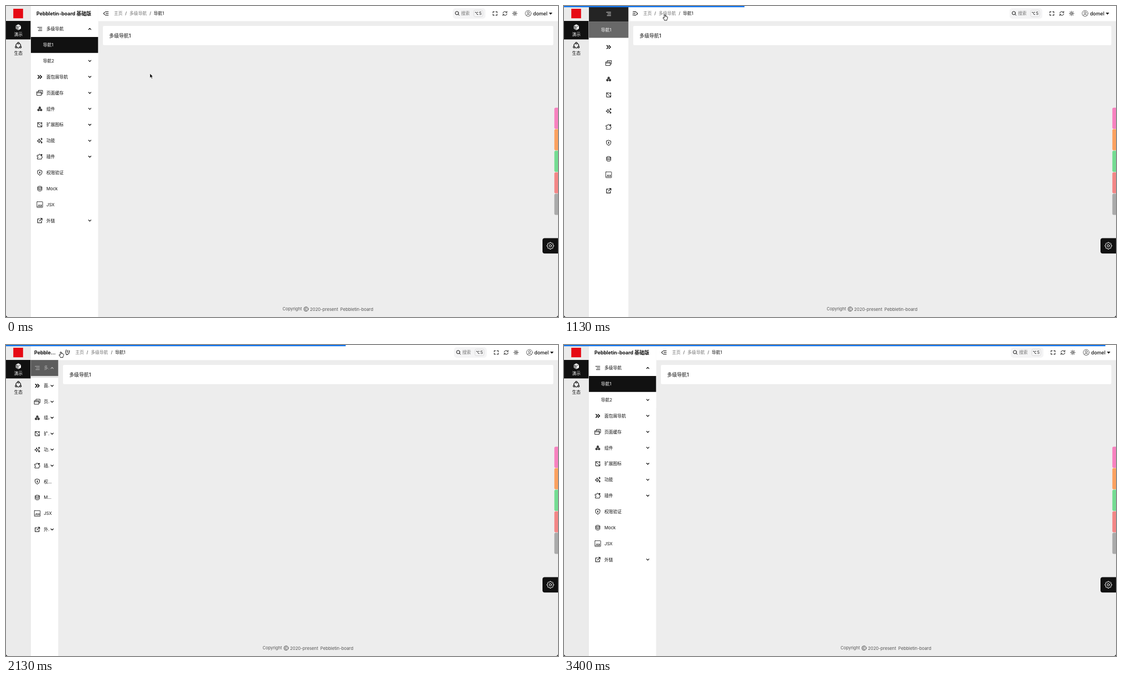
Animation of 997 by 562 pixels, one loop 3470 ms. Source, as an HTML page:

```html
<!DOCTYPE html>
<html lang="en">
<head>
<meta charset="utf-8">
<title>Sidebar toggle</title>
<style>
html, body { margin: 0; width: 100%; height: 100%; overflow: hidden; background: #ededed; }
#stage { display: block; width: 997px; height: 562px; font-family: Inter, "Noto Sans CJK SC", "Noto Sans CJK", sans-serif; font-size: 7.78px; color: #111; }
text { fill: currentColor; white-space: pre; }
.i { fill: none; stroke: currentColor; stroke-width: 1; stroke-linecap: round; stroke-linejoin: round; }
.f { fill: currentColor; stroke: none; }
</style>
</head>
<body>
<svg id="stage" viewBox="0 0 997 562"></svg>
<script>
const stage = document.getElementById('stage');
const LOOP = 3470, STEP = 200 / 3, STEPS = 52;
const LEFT = 45, OPEN = 166.3, SHUT = 79.8, ROW = 28.85;
const CLOSE_AT = 1033, OPEN_AT = 2091;
const USER = 'domel', APP = 'Pebbletin-board';

function add(parent, tag, attrs = {}, inner = '') {
  const e = document.createElementNS('http://www.w3.org/2000/svg', tag);
  set(e, attrs);
  if (inner) e.innerHTML = inner;
  parent.appendChild(e);
  return e;
}
function set(e, attrs) { for (const k in attrs) e.setAttribute(k, attrs[k]); }
const rect = (p, x, y, width, height, fill, rx = 0) => add(p, 'rect', { x, y, width, height, fill, rx });
const move = (e, x, y, extra = '') => e.setAttribute('transform', `translate(${x} ${y}) ${extra}`);
const show = (e, on) => e.setAttribute('display', on ? 'inline' : 'none');

// text is placed by its vertical middle
function label(p, x, y, str, attrs = {}) {
  const size = attrs['font-size'] || 7.78;
  const e = add(p, 'text', { x, y: y + size * 0.365, ...attrs });
  e.textContent = str;
  return e;
}
function icon(p, x, y, body, attrs = {}) {
  const g = add(p, 'g', { class: 'i', ...attrs }, body);
  move(g, x, y);
  return g;
}
function fit(e, str, room) {
  e.textContent = str;
  for (let n = str.length - 1; n > 0 && e.getComputedTextLength() > room; n--) {
    e.textContent = str.slice(0, n) + '…';
  }
}

function bezier(x1, y1, x2, y2) {
  const at = (a, b, u) => 3 * (1 - u) ** 2 * u * a + 3 * (1 - u) * u * u * b + u ** 3;
  return x => {
    if (x <= 0) return 0;
    if (x >= 1) return 1;
    let lo = 0, hi = 1;
    for (let i = 0; i < 24; i++) {
      const u = (lo + hi) / 2;
      if (at(x1, x2, u) < x) lo = u; else hi = u;
    }
    return at(y1, y2, lo);
  };
}
const ease = bezier(0.25, 0.1, 0.25, 1);
const swift = bezier(0.4, 0, 0.2, 1);
// 0 = expanded, 1 = collapsed
const folded = (t, curve, ms) => curve((t - CLOSE_AT) / ms) - curve((t - OPEN_AT) / ms);
const edge = t => OPEN - (OPEN - SHUT) * folded(t, ease, 300);

const star = (x, y, r) => `<path d="M${x} ${y - r}Q${x} ${y} ${x + r} ${y}Q${x} ${y} ${x} ${y + r}Q${x} ${y} ${x - r} ${y}Q${x} ${y} ${x} ${y - r}Z"/>`;
const hex = (x, y) => `<path class="f" d="M${x} ${y - 2.3}l2 1.15v2.3l-2 1.15l-2-1.15v-2.3z"/><path d="M${x - 1.4} ${y - .7}l1.4.8l1.4-.8" stroke="#fff" stroke-width=".5"/>`;
const DOWN = '<path d="M-2.2-1.1L0 1.1L2.2-1.1" stroke-width="1.2"/>';
const UP = '<path d="M-2.2 1.1L0-1.1L2.2 1.1" stroke-width="1.2"/>';

// name, icon, has children
const MENU = [
  ['多级导航', '<path d="M-3.8-3H3.8M-1.6 0H3.8M-2.6 3H3.8" stroke-width="1.1"/>', 1],
  ['面包屑导航', '<path d="M-3.2-2.8L-.4 0L-3.2 2.8M.6-2.8L3.4 0L.6 2.8" stroke-width="1.6"/>', 1],
  ['页面缓存', '<path d="M-2.5-2V-4.5H5V1.8H2.8M-5-2H2.8V4.5H-5ZM-5 0H2.8" stroke-width=".9"/>', 1],
  ['组件', hex(0, -1.9) + hex(-2.3, 2) + hex(2.3, 2), 1],
  ['扩展图标', '<path d="M.5-3.8H-3.8V3.8H3.8V-.2M-3.8-3.8L3.8 3.8M3-4.3V-1.5M1.6-2.9H4.4"/>', 1],
  ['功能', star(-1.2, .4, 3.6) + star(3.2, -3, 1.5) + star(3.2, 3.2, 1.5), 1],
  ['插件', '<path d="M-4.4-2.6H-1.6Q-1.9-4.8 0-4.6Q1.4-4.5 1.2-2.6H3.2V-.4Q5-.2 4.8 1Q4.7 2.2 3.2 2V4.4H-4.4V2Q-2.7 2-2.8.8Q-2.9-.3-4.4-.2Z" stroke-width=".9"/>' + '<path class="f" d="M3.2-5L4.9-3.3L3.2-1.6L1.5-3.3Z"/>', 1],
  ['权限验证', '<path d="M0-4.6L3.9-3.2V.2Q3.7 3.2 0 4.7Q-3.7 3.2-3.9.2V-3.2Z"/><path d="M0-.8V1.6" stroke-width="1.2"/><circle class="f" cy="-1" r="1"/>', 0],
  ['Mock', '<ellipse cy="-2.7" rx="3.7" ry="1.5"/><path d="M-3.7-2.7V2.7Q-3.4 4.2 0 4.2T3.7 2.7V-2.7M-3.7 0Q-3.4 1.5 0 1.5T3.7 0"/>', 0],
  ['JSX', '<rect x="-5.2" y="-5.2" width="10.4" height="10.4" rx=".5" stroke-width=".8"/><text class="f" y="3.9" font-size="4.6" font-weight="700" text-anchor="middle">JSX</text>', 0],
  ['外链', '<path d="M-.6-3H-3.8V4H3.2V.8M1-4H4.2V-.8M4-3.8L-.6.8" stroke-width="1.1"/>', 1]
];

// main area
rect(stage, 0, 0, 997, 562, '#ededed');
const card = rect(stage, 175, 36, 813.5, 34.7, '#fff', 2);
const heading = label(stage, 0, 53.4, '多级导航1', { 'font-size': 8.85, 'font-weight': 500 });
const footer = add(stage, 'g', { color: '#555' });
label(footer, 499.5, 547.7, 'Copyright', { 'font-size': 7.5 });
icon(footer, 542, 547.7, '<circle r="4"/><path d="M1.6-1.4A2 2 0 1 0 1.6 1.4"/>', { 'stroke-width': .8 });
label(footer, 549, 547.7, '2020-present');
label(footer, 603.8, 547.7, APP);

// top bar
const bar = rect(stage, 0, 0, 997, 27.3, '#fff');
const crumbs = add(stage, 'g');
const toggle = icon(crumbs, 14.3, 13.5, '<path d="M-2.4-2.2L-4.4 0L-2.4 2.2M-1.2-3H4.2M-.2 0H4.2M-1.2 3H4.2" stroke-width="1.1"/>');
[[28.7, '主页', '#777'], [49, '/', '#333'], [56.8, '多级导航', '#777'], [93, '/', '#333'], [100.5, '导航1', '#111']]
  .forEach(([x, s, color]) => label(crumbs, x, 13.5, s, { color }));

const tools = add(stage, 'g');
rect(tools, 807, 4, 59, 19, '#f4f4f5', 5);
icon(tools, 815, 13.3, '<circle cx="-.5" cy="-.5" r="3"/><path d="M1.8 1.8L3.6 3.6"/>');
label(tools, 822, 13.5, '搜索', { color: '#777' });
set(rect(tools, 844.7, 7.3, 16.6, 12.2, '#f4f4f5', 3), { stroke: '#d4d4d4', 'stroke-width': .7 });
icon(tools, 850, 13.4, '<path d="M-2.6-2H-1L1 2H2.6M.8-2H2.6" stroke-width=".8"/>');
label(tools, 854.6, 13.5, 'S', { 'font-size': 7 });
icon(tools, 883.3, 13.5, '<path d="M-3.6-1.2V-3.2H-1.4M1.4-3.2H3.6V-1.2M3.6 1.2V3.2H1.4M-1.4 3.2H-3.6V1.2" stroke-width="1.1"/>');
icon(tools, 901.2, 13.5, '<path d="M-3.6-.6A3.7 3.7 0 0 1 3.2-1.8M3.6.6A3.7 3.7 0 0 1-3.2 1.8M3.6-3.9V-1.6H1.4M-3.6 3.9V1.6H-1.4" stroke-width=".9"/>');
const rays = [...Array(8).keys()].map(i => `<path d="M0-3.2V-4" transform="rotate(${i * 45})"/>`).join('');
icon(tools, 919, 13.5, '<circle r="1.7"/>' + rays);
icon(tools, 943.2, 13.4, '<circle r="5.3"/><circle cy="-1.3" r="1.9"/><path d="M-3.6 3.7Q-3 1.8 0 1.8T3.6 3.7"/>', { color: '#444', style: 'stroke-width:.8' });
label(tools, 952, 13.5, USER, { 'font-size': 8.8, 'font-weight': 500 });
icon(tools, 983.7, 13.7, '<path class="f" d="M-3.1-1.8H3.1L0 2Z"/>');

// primary strip
rect(stage, 0, 0, LEFT, 562, '#ebebeb');
rect(stage, 13.2, 5, 17.6, 17.2, '#e60a14');
rect(stage, 0, 27, 44.4, 33.4, '#111');
icon(stage, 22.2, 38.3, '<path d="M0-5.2L4.6-2.7L0-.2L-4.6-2.7Z" fill="#ddd"/><path d="M-4.8-2.2L-.2.3V5.4L-4.8 2.8Z" fill="#999"/><path d="M4.8-2.2L.2.3V5.4L4.8 2.8Z" fill="#fff"/>', { stroke: 'none', style: 'stroke:none' });
label(stage, 22.2, 51.2, '演示', { color: '#fff', 'text-anchor': 'middle' });
icon(stage, 22.2, 71.5, '<circle r="4.4"/><g fill="#ebebeb"><circle cy="-4.3" r="1.5"/><circle cx="-4" cy="2.8" r="1.5"/><circle cx="4" cy="2.8" r="1.5"/></g>', { style: 'stroke-width:1.2' });
label(stage, 22.2, 84.7, '生态', { 'text-anchor': 'middle' });

// secondary sidebar, clipped to its width
const side = add(stage, 'svg', { x: LEFT, y: 0, width: 121, height: 562 });
rect(side, 0, 0, 130, 562, '#fff');
const titleBox = add(side, 'svg', { y: 0, height: 27 });
const title = label(titleBox, 0, 13.6, '', { 'font-size': 8.85, 'font-weight': 700 });
const rows = MENU.map(([name, art, kids], n) => {
  const g = add(side, 'g');
  const back = n ? null : rect(g, 0, -ROW / 2, 130, ROW, '#fff');
  const mark = icon(g, 0, 0, art);
  const box = add(g, 'svg', { y: -12, height: 24 });
  const text = label(box, 0, 12, name);
  const arrow = kids ? icon(g, 0, 0, n ? DOWN : UP) : null;
  return { g, back, mark, box, text, arrow, name };
});
const sub = add(side, 'svg', { x: 0, width: 130 });
rect(sub, 0, 0, 130, ROW * 2, '#fff');
rect(sub, 0, 0, 130, ROW, '#111');
label(sub, 21.7, ROW / 2, '导航1', { color: '#fff' });
label(sub, 21.7, ROW * 1.5, '导航2');
const subArrow = icon(sub, 0, 0, DOWN);

// right edge
['#f781bf', '#fba15f', '#74dc92', '#f38686', '#aaa'].forEach((c, i) =>
  rect(stage, 990.4, 183.7 + i * 38.9, 12, 38.2, c, 2.5));
rect(stage, 969, 419.4, 40, 27.8, '#111', 4);
const gear = [...Array(8).keys()].map(i => {
  const p = (r, d) => { const a = (i * 45 + d) * Math.PI / 180; return `${(r * Math.cos(a)).toFixed(2)} ${(r * Math.sin(a)).toFixed(2)}`; };
  return `${p(4.8, -18)}L${p(6.2, -9)}L${p(6.2, 9)}L${p(4.8, 18)}`;
}).join('L');
icon(stage, 983.2, 433.3, `<path d="M${gear}Z"/><circle r="2.1"/>`, { color: '#fff' });

add(stage, 'path', { d: 'M0 558.5Q.3 561.7 4 562H0ZM997 558.5Q996.7 561.7 993 562H997Z', fill: '#111' });
const progress = rect(stage, 0, 0, 0, 2.2, '#0f74ee');

const arrowTip = add(stage, 'path', { d: 'M0 0V7.9L1.8 6.3L3.1 9.2L4.5 8.6L3.2 5.8H5.6Z', fill: '#000', stroke: '#fff', 'stroke-width': .6 });
const hand = add(stage, 'path', {
  d: 'M-1 .8Q0-.4 1 .8V3.4Q2-.1 2.6 3.7Q3.6 3 4 4.2Q5.2 3.8 5.1 5.2Q5 7.8 3.9 8.9V10.4H-.8V9.4L-3 6.6Q-3.6 5.2-2.2 5.2L-1 6.2Z',
  fill: '#fff', stroke: '#111', 'stroke-width': .9, 'stroke-linejoin': 'round'
});

const TRACK = [[0, 260, 122], [640, 176, 18], [900, 182, 15.5], [1134, 182, 15.5], [1467, 117, 17.2], [1800, 99, 12.2], [2140, 99, 12.2], [2470, 112, -14]];
function pointer(t) {
  const i = TRACK.findIndex(k => k[0] > t);
  if (i < 0) return TRACK[TRACK.length - 1].slice(1);
  const [a, b] = [TRACK[i - 1], TRACK[i]];
  const u = (t - a[0]) / (b[0] - a[0]), s = u * u * (3 - 2 * u);
  return [a[1] + (b[1] - a[1]) * s, a[2] + (b[2] - a[2]) * s];
}
const grey = v => `rgb(${[v, v, v].map(Math.round)})`;

function draw(ms) {
  const k = Math.min(STEPS - 1, Math.floor((ms % LOOP + 5) / STEP));
  const t = k * STEP;
  const x = edge(t), w = x - LEFT, p = 1 - folded(t, ease, 300);
  const shut = t >= CLOSE_AT && t < OPEN_AT;
  const drift = x - edge(t - 4);

  set(card, { x: x + 8.7, width: 988.5 - x - 8.7 });
  set(bar, { x, width: 997 - x });
  heading.setAttribute('x', x + 20);
  move(footer, (x - OPEN) / 2, 0);
  move(crumbs, x + drift, 0);
  move(tools, drift, 0);
  move(toggle, 14.3, 13.5, `rotate(${-180 * folded(t + 15, swift, 150)})`);

  side.setAttribute('width', w);
  show(titleBox, !shut);
  const pad = 5.2 + 4.8 * p, chevX = w - 10.2 - 4.8 * p;
  if (!shut) {
    const room = w - pad - 4;
    set(titleBox, { x: pad, width: room });
    fit(title, APP + ' 基础版', room);
  }

  const top = shut ? -.2 : 27.1;
  const q = 1 - folded(t, swift, 300), subH = 2 * ROW * q;
  const m = folded(t, swift, 150);
  rows.forEach((r, n) => {
    move(r.g, 0, top + ROW * (n + .5) + (n ? subH : 0));
    move(r.mark, shut ? w / 2 : 10.6 + 5.4 * p, 0);
    show(r.box, !shut);
    if (r.arrow) { show(r.arrow, !shut); move(r.arrow, chevX, 0); }
    if (shut) return;
    const tx = 22.2 + 5.8 * p, room = (r.arrow ? chevX - 5 : w - 9.5) - tx;
    set(r.box, { x: tx, width: Math.max(0, room) });
    fit(r.text, r.name, room);
  });
  rows[0].back.setAttribute('fill', grey(255 - 238 * m));
  rows[0].g.setAttribute('color', grey(17 + 238 * m));

  show(sub, q > .004);
  set(sub, { y: top + ROW, height: subH, opacity: q ** .75 });
  move(subArrow, chevX, ROW * 1.5);
  show(subArrow, !shut);

  progress.setAttribute('width', 997 * k / STEPS);
  const [cx, cy] = pointer(t), over = cy < 24;
  show(arrowTip, !over);
  show(hand, over && cy > -13);
  move(arrowTip, cx, cy);
  move(hand, cx, cy);
}

const begin = performance.now();
function tick() {
  draw(performance.now() - begin);
  requestAnimationFrame(tick);
}
tick();
</script>
</body>
</html>
```
